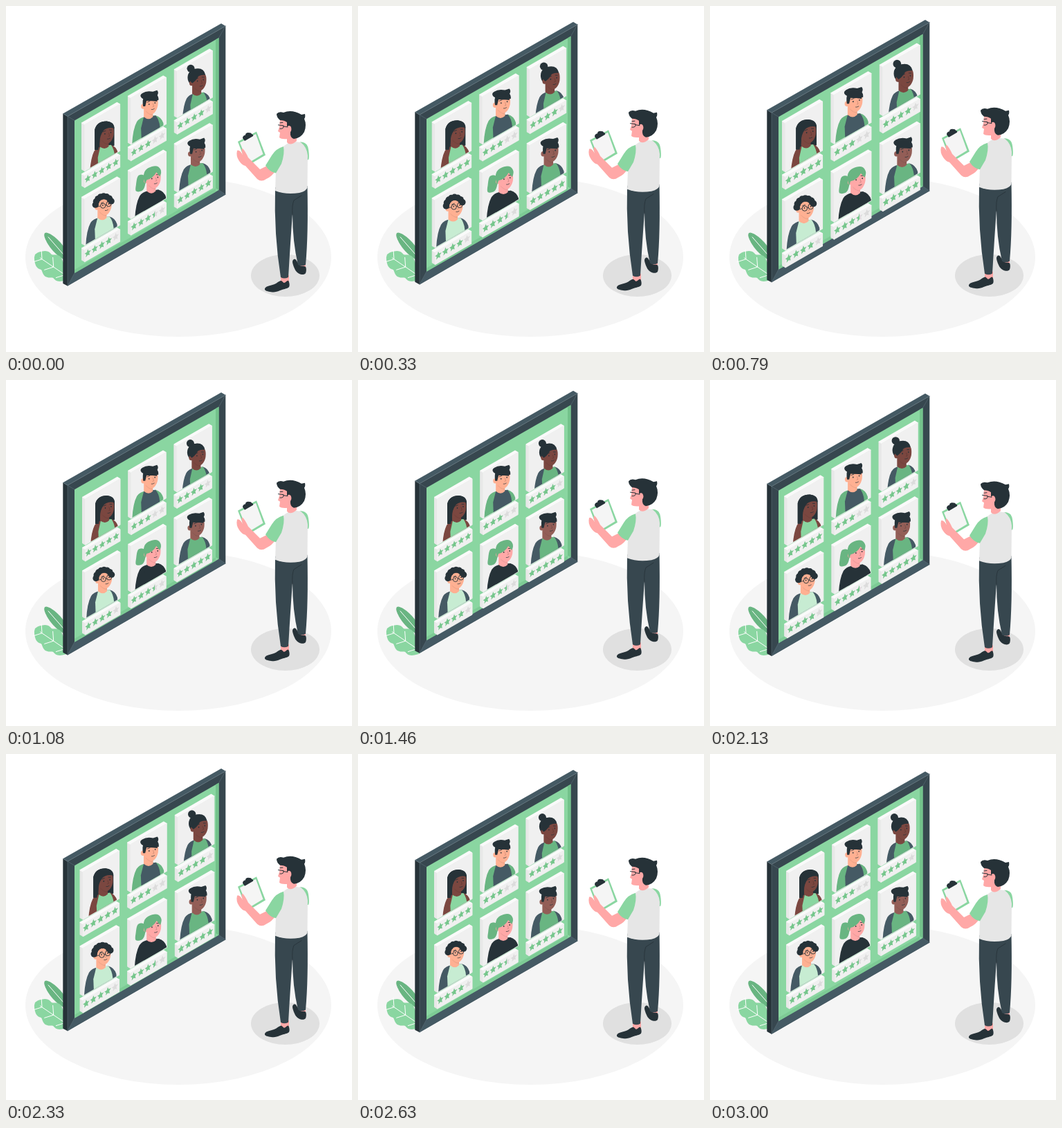
Animation, 500 px wide and 500 px high, one loop 3040 ms. Source, as an HTML page:

```html
<!DOCTYPE html>
<html lang="en">
<head>
<meta charset="utf-8">
<title>Candidate board</title>
<style>
html, body { margin: 0; width: 100%; height: 100%; overflow: hidden; background: #fff; }
svg { display: block; width: 100vw; height: 100vh; }
</style>
</head>
<body>
<svg id="stage" viewBox="0 0 500 500"></svg>
<script>
const LOOP = 3040, FLOAT = 3000, BEAT = 1500;
const GREEN = '#8ad6a1', MID = '#69b582', MINT = '#c7ecd2';
const INK = '#263238', SLATE = '#37474f', STEEL = '#455a64';
const PINK = '#ffa8a7', PEACH = '#ffb092', BROWN = '#7b4740', TAN = '#935e57';
const SLOPE = Math.tan(Math.PI / 6);

const path = (fill, d) => `<path fill="${fill}" d="${d}"/>`;
const line = (color, width, d) =>
  `<path fill="none" stroke="${color}" stroke-width="${width}" stroke-linecap="round" stroke-linejoin="round" d="${d}"/>`;
const oval = (fill, x, y, rx, ry = rx) => `<ellipse fill="${fill}" cx="${x}" cy="${y}" rx="${rx}" ry="${ry}"/>`;
const group = (transform, content) => `<g transform="${transform}">${content}</g>`;
const repeat = (n, make) => Array.from({ length: n }, (_, i) => make(i)).join('');

// Closed smooth curve through a few points given as "x y x y ..."
function blob(fill, text) {
  const n = text.split(' ').map(Number), count = n.length / 2;
  const at = i => [n[(i + count) % count * 2], n[(i + count) % count * 2 + 1]];
  const d = repeat(count, i => {
    const [a, b, c, e] = [at(i - 1), at(i), at(i + 1), at(i + 2)];
    const p = b.map((v, k) => v + (c[k] - a[k]) / 6), q = c.map((v, k) => v - (e[k] - b[k]) / 6);
    return `C${p} ${q} ${c}`;
  });
  return path(fill, `M${at(0)}${d}Z`);
}

// Leaf around a midrib, its edge swelling into lobes
function leaf(fill, [x, y], [tx, ty], width, lobes) {
  const dx = tx - x, dy = ty - y, len = Math.hypot(dx, dy), steps = 40;
  const point = (t, w) => `${(x + dx * t - dy / len * w).toFixed(1)},${(y + dy * t + dx / len * w).toFixed(1)}`;
  const half = t => width * Math.sqrt(Math.sin(Math.PI * t)) * (1 - (lobes ? .22 * (1 - Math.abs(Math.sin(lobes * Math.PI * t))) : 0));
  const edge = i => i <= steps ? point(i / steps, half(i / steps)) : point(2 - i / steps, -half(2 - i / steps));
  const veins = repeat(lobes, i => {
    const t = (i + .4) / lobes, w = width * .6;
    return `M${point(t + .14, w)}L${point(t, 0)} ${point(t + .14, -w)}`;
  });
  return `<polygon fill="${fill}" points="${repeat(2 * steps, i => edge(i) + ' ')}"/>` +
    line('#fff', 1, `M${point(.1, 0)}L${point(.85, 0)}${veins}`);
}

// Hair styles around a head centred on 0,0: drawn behind the bust or over the face
const cap = color => path(color, 'M-11 3Q-14-16 0-16 12-16 11-6 2-4-6-5L-8 3Z');
const styles = {
  long: {
    back: c => path(c, 'M-17 23V-6Q-14-18 0-18 12-17 11-6V17L-3 22Z'),
    front: c => path(c, 'M-17 23V-6Q-14-18 0-18 10-17 11-8 0-10-5-4-10 3-10 12L-12 23Z'),
  },
  quiff: { front: c => cap(c) + path(c, 'M-13-9Q-17-13-12-16-6-20 3-18L9-20Q12-17 9-12L9-4-8-6Z') },
  bun: {
    back: c => oval(c, -12, -18, 5.5) + oval(c, -5, -5, 11.5, 12.5),
    front: c => path(c, 'M-13 0Q-15-17-2-18 7-18 9-9 2-9-1-7-5 0-10 3Z'),
  },
  curls: {
    front: c => repeat(8, i => {
      const a = Math.PI * (1.02 + i * .118);
      return oval(c, 12 * Math.cos(a) - 1, 13 * Math.sin(a), 4.6);
    }),
  },
  tail: {
    back: c => blob(c, '-13 -4 -22 -4 -25 8 -25 18 -16 17 -12 8'),
    front: c => path(c, 'M-12 8Q-18-9-8-15 6-22 10-13 12-9 9-3L4-9Q-1 0-10 2Z'),
  },
};

const face = skin => oval(skin, -11, 3, 3, 3.6) + blob(skin, '-9 -9 1 -11 9 -9 10 2 6 11 0 14 -7 9 -10 2');
const features =
  oval(INK, -2.5, 0, .8, 1) + oval(INK, 6, -2, .8, 1) +
  line(INK, .8, 'M-5-3l3.5-1.3M4-5.6l3 .1') + line('#0003', .8, 'M3-1l1.3 4-1.6 .6') + line(INK, .7, 'M1 7.5q2 .4 4-1.2');
const glasses = line(INK, .8, 'M-10 2L-6 1M1.3 0l1.3-.5') +
  [-2.2, 6].map(x => `<circle cx="${x}" cy="${-x * .3}" r="3.5" fill="none" stroke="${INK}" stroke-width=".9"/>`).join('');

const people = [
  { x: 146, y: 185, skin: BROWN, shirt: GREEN, sleeve: BROWN, style: 'long', slim: .9, rating: 5 },
  { x: 143, y: 181, skin: PEACH, shirt: STEEL, sleeve: MID, style: 'quiff', rating: 3 },
  { x: 146, y: 186, skin: BROWN, shirt: MID, sleeve: STEEL, style: 'bun', slim: .9, rating: 4 },
  { x: 143, y: 181, skin: PEACH, shirt: MINT, sleeve: STEEL, style: 'curls', glasses, rating: 4 },
  { x: 147, y: 181, skin: PINK, shirt: INK, sleeve: INK, hair: MID, style: 'tail', rating: 3.5 },
  { x: 144, y: 181, skin: TAN, shirt: MID, sleeve: STEEL, style: 'quiff', rating: 5 },
];

function portrait({ x, y, skin, shirt, sleeve, style, slim = 1, hair = INK, glasses = '' }) {
  const { back, front } = styles[style];
  return group(`translate(${x} ${y})`,
    (back ? back(hair) : '') +
    group(`scale(${slim} 1)`,
      path(sleeve, 'M-27 60Q-26 36-20 25-16 19-8 18L7 16Q15 18 18 27L19 60Z') +
      path(shirt, 'M-13 60L-14 34-10 18 7 16Q12 22 13 32V60Z')) +
    path(skin, 'M-10 5L3 12V18Q-3 24-10 18Z') + path('#0001', 'M-8 9L3 13V16Q-4 15-8 9Z') +
    face(skin) + features + glasses + front(hair));
}

const star = repeat(10, i => {
  const a = i * Math.PI / 5, r = i % 2 ? 2.6 : 5.5;
  return `${(r * Math.sin(a)).toFixed(2)},${(-r * Math.cos(a)).toFixed(2)} `;
});

const stars = rating => repeat(5, i => {
  const left = rating - i;
  const fill = left >= 1 ? '#76c68c' : left > 0 ? 'url(#half)' : '#dcdcdc';
  return `<polygon points="${star}" fill="${fill}" transform="matrix(.87 -.5 0 1 ${119 + i * 10} ${249.3 - i * 10 * SLOPE})"/>`;
});

// Raised panel with a thin left side and top; y is its upper left corner
function slab(y, h) {
  const w = 50.3, rise = w * SLOPE;
  const side = (fill, d) => `<path fill="${fill}" stroke="${fill}" stroke-linejoin="round" d="${d}"/>`;
  return side('#e8e8e8', `M110.5 ${y}l4.2 2.5v${h}l-4.2-2.5z`) +
    side('#fafafa', `M110.5 ${y}l${w} ${-rise}l4.2 2.5l${-w} ${rise}z`) +
    side('#f0f0f0', `M114.7 ${y + 2.5}l${w} ${-rise}v${h}l${-w} ${rise}z`);
}

function card(person, i) {
  const x = i % 3 * 66.2, y = -x * SLOPE + (i > 2 ? 106.3 : 0);
  return group(`translate(${x} ${y})`, slab(169.3, 66.5) + slab(242.3, 17) + stars(person.rating) +
    `<g clip-path="url(#window)">${portrait(person)}</g>`);
}

const ground = oval('#f5f5f5', 249, 363, 221, 115) + oval('#e0e0e0', 403.5, 389.5, 49.5, 30.5);
const plant = leaf(MID, [90, 367], [56, 328], 8, 0) + leaf(GREEN, [92, 393], [42, 359], 18, 3);

// Wall between two x positions along the board, tops and bottoms following the slope
function quad(fill, x1, top1, bottom1, x2, top2, bottom2) {
  return path(fill, `M${x1} ${top1}L${x2} ${top2}V${bottom2}L${x1} ${bottom1}Z`);
}
const board =
  quad(INK, 82.3, 155.6, 401, 89, 159.5, 404.7) +
  path(STEEL, 'M82.3 155.6L311 25.3 317.3 29 89 159.5Z') +
  quad(SLATE, 89, 159.5, 404.7, 317.3, 29, 272.5) +
  path(STEEL, 'M89 404.7L99 386 307.5 266 317.3 272.5Z') +
  quad(GREEN, 99, 165.5, 386, 307.5, 46, 266) +
  quad('#73c28b', 303, 48.5, 263.5, 307.5, 46, 266) +
  quad('#7dcb95', 99, 381, 386, 303, 263.5, 268.5) +
  line('#60757f', .5, 'M82.3 155.6L89 159.5 317.3 29M99 165.5L89 159.5V404.7L99 386M317.3 29L307.5 46M317.3 272.5L307.5 266');

const legs =
  path(PINK, 'M397 389H409V400H397ZM424 362H433V380H424Z') +
  blob(INK, '397 397 402 400 408 397 409 406 399 410 387 413.5 375 411 376 406 388 402') +
  blob(INK, '433 377 433 386 427 388 419 383 414 370 418 366 425 375') +
  path(SLATE, 'M389 262Q387 330 397 392 402 395 408 392 411 340 414 300 414 340 422 374 428 377 433 374 437 330 435.5 260Z') +
  line(INK, .8, 'M414 302Q413 288 416 281L427 274');

const torso =
  blob(GREEN, '424 198 433 199 437 207 437 222 428 216') +
  path('#e6e6e6', 'M401 203Q407 197 417 196L426 197Q435 204 436 216L435.5 262Q435 267 424 270 404 273 389 267L390 238Z');

const head =
  path(PINK, 'M406 182L420 188V195Q411 203 406 197Z') +
  path(PINK, 'M396 164L395 175 393 181 396 183 395 190Q398 193 407 192L414 186V166Z') +
  path(INK, 'M391 156Q394 152 401 154 413 149 427 157L432 156Q433 161 431 163 435 172 431 182 426 191 416 192 410 190 411 182L406 174V168Q402 165 396 165 391 161 391 156Z') +
  oval(PINK, 409, 178, 3.4, 5) +
  line(INK, 1, 'M393.5 172L401 173Q402 178 396 177.5M401 174L407 175M396 169L400 168.5');

const clipboard =
  path(GREEN, 'M335 196L362 181.5 375 215.5 348.5 231Z') +
  path('#f5f5f5', 'M338 197.5L361 185 371.5 214 350 227Z') +
  path(INK, 'M342 191Q342 187 346 186.5 346 183 350 183 355 183 355 185 358 186 357 188L345 195Z');

const arm =
  path(PINK, 'M377 231L367 236 350 219Q346 210 342 206 339 206 342 215 337 207 334 209 332 217 337 224 341 230 346 231L363 250Q369 255 376 250 385 246 390 237Z') +
  path(GREEN, 'M401 203Q390 206 384 216L375 230.5Q381 240 390 241.5L398 228Q403 213 401 203Z');

document.getElementById('stage').innerHTML =
  `<defs><linearGradient id="half"><stop offset=".5" stop-color="#76c68c"/><stop offset=".5" stop-color="#dcdcdc"/></linearGradient>
  <clipPath id="window"><path d="M110 100H165V209L114.7 238V236H110Z"/></clipPath></defs>` +
  ground + plant + `<g class="float">${board}</g><g id="cards">${people.map(card).join('')}</g>` +
  `<g class="float">${legs + torso + head + clipboard + arm}</g>`;

const cards = document.getElementById('cards');
const floaters = document.querySelectorAll('.float');

// Two linear beats per cycle, the first falling back more slowly
function scaleAt(p) {
  const first = p < .1 ? p / .1 : (.3 - p) / .2;
  const second = 1 - Math.abs(p - .5) / .1;
  return 1 + .1 * Math.max(0, first, second);
}

function draw(now) {
  const t = Math.min(now % LOOP + 15, FLOAT);
  const lift = -10 * (1 - Math.abs(1 - 2 * t / FLOAT));
  floaters.forEach(g => g.setAttribute('transform', `translate(0 ${lift})`));
  const s = scaleAt(t % BEAT / BEAT);
  cards.setAttribute('transform', `translate(204 215.5) scale(${s}) translate(-204 -215.5)`);
}

let start;
function tick(now) {
  start ??= now;
  draw(now - start);
  requestAnimationFrame(tick);
}
draw(0);
requestAnimationFrame(tick);
</script>
</body>
</html>
```
